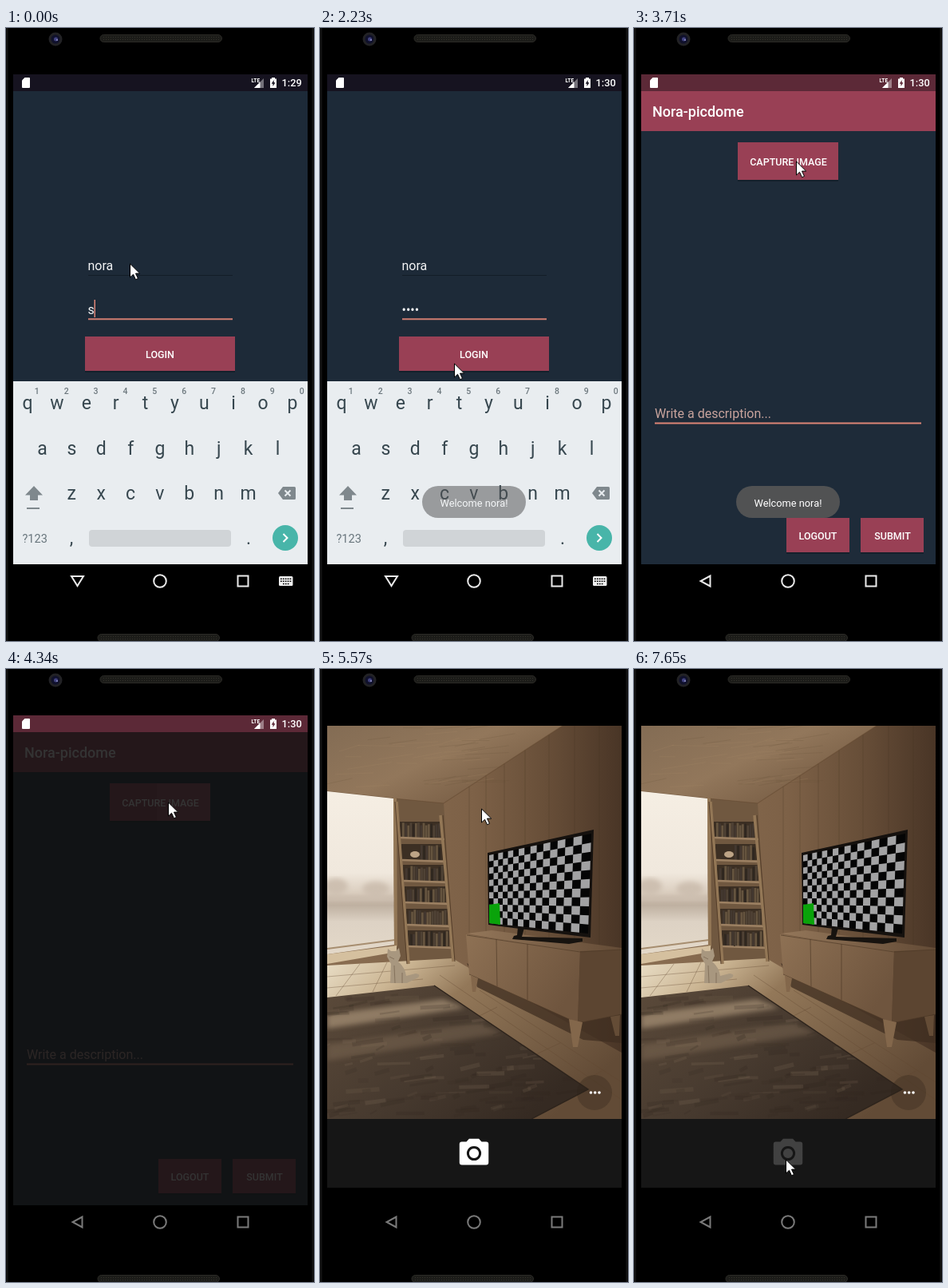
Recreate the animation shown at these times as an HTML page. Size 386 by 767 pixels, loop 8 s.

```html
<!DOCTYPE html>
<html lang="en">
<head>
<meta charset="utf-8">
<title>Phone login and camera</title>
<style>
html, body { margin: 0; width: 100%; height: 100%; overflow: hidden; background: #000; }
svg { display: block; width: 100vw; height: 100vh; font-family: Roboto, sans-serif; }
.mid { text-anchor: middle; }
.btn { font-size: 12.5px; font-weight: 500; fill: #fff; text-anchor: middle; }
.field { font-size: 16px; fill: #f2f3f4; }
.key { font-size: 23px; fill: #37474f; text-anchor: middle; }
.hint { font-size: 10.5px; font-weight: 500; fill: #6c777d; text-anchor: middle; }
</style>
</head>
<body>
<svg viewBox="0 0 386 767">
<defs>
  <linearGradient id="ceilFill" x2="1" y2=".7"><stop stop-color="#836c54"/><stop offset=".5" stop-color="#92775b"/><stop offset="1" stop-color="#71573f"/></linearGradient>
  <linearGradient id="wallFill"><stop stop-color="#8a6e52"/><stop offset=".5" stop-color="#7d6147"/><stop offset=".75" stop-color="#674e38"/><stop offset="1" stop-color="#493526"/></linearGradient>
  <linearGradient id="skyFill" x2="0" y2="1"><stop stop-color="#f5eee3"/><stop offset=".5" stop-color="#f0e8dd"/><stop offset=".63" stop-color="#d9ccbd"/><stop offset=".68" stop-color="#b9aa9a"/><stop offset=".8" stop-color="#ddd2c4"/><stop offset="1" stop-color="#e3d8c8"/></linearGradient>
  <linearGradient id="floorFill" x2="1" y2=".6"><stop stop-color="#eadfc8"/><stop offset=".22" stop-color="#cbb593"/><stop offset=".42" stop-color="#937859"/><stop offset="1" stop-color="#624b36"/></linearGradient>
  <linearGradient id="rugFill" x2="1" y2=".6"><stop stop-color="#5b4a3a"/><stop offset=".55" stop-color="#473a2f"/><stop offset="1" stop-color="#352a22"/></linearGradient>
  <linearGradient id="topFill"><stop stop-color="#94775a"/><stop offset="1" stop-color="#634b36"/></linearGradient>
  <linearGradient id="doorFill" x2="1" y2=".5"><stop stop-color="#8e7154"/><stop offset="1" stop-color="#6f553e"/></linearGradient>
  <filter id="soft"><feGaussianBlur stdDeviation="3"/></filter>
  <clipPath id="photoClip"><path d="M9 71h369v492H9z"/></clipPath>
  <clipPath id="rugClip"><path id="rugShape" d="M9 411L143 396 336 526 265 563H9z"/></clipPath>
  <clipPath id="paneClip"><path id="paneShape" d="M9 153L92 162 93 345 9 357z"/></clipPath>
  <path id="camIcon" fill-rule="evenodd" d="M-8-24H8L12.5-19H20a4 4 0 0 1 4 4V15a4 4 0 0 1-4 4H-20a4 4 0 0 1-4-4V-15a4 4 0 0 1 4-4h7.500zM0-12a12 12 0 1 0 .01 0zM0-8a8 8 0 1 1-.01 0z"/>
  <g id="statusIcons" fill="#fff">
    <path d="M23.500 62H29a1 1 0 0 1 1 1V74a1 1 0 0 1-1 1H21a1 1 0 0 1-1-1V65.500z"/>
    <text x="307.500" y="67.500" font-size="6.500" font-weight="700">LTE</text>
    <path d="M323 63V75H311z" opacity=".4"/><path d="M318.500 67.500V75H311z"/>
    <path fill-rule="evenodd" d="M333 63.500V62h4v1.500h2V75h-8V63.500zM335.700 65l-3 4.800h1.800V73l3-4.800h-1.800z"/>
  </g>
</defs>

<path fill="#000" d="M0 0h386v767H0z"/>
<path d="M1.500 0V767M384.500 0V767" stroke="#141414" stroke-width="2"/>
<g fill="#1c1c19" stroke="#2b2a26"><rect x="118" y="8.500" width="152.500" height="9" rx="4.500"/><rect x="115" y="758.500" width="152.500" height="9" rx="4.500"/></g>
<path d="M122 11.500H267M122 14.500H267M119 761.500H264M119 764.500H264" stroke="#33322b" stroke-dasharray="1 2"/>
<circle cx="62" cy="14" r="8.500" fill="#222225"/><circle cx="62" cy="14" r="5.500" fill="#10112b"/><circle cx="62.500" cy="14" r="2.500" fill="#41427f"/><circle cx="64" cy="15" r="1" fill="#9192c8"/>

<g id="login">
  <path fill="#1d2a38" d="M9 58h369v384H9z"/><path fill="#161320" d="M9 58h369v21H9z"/>
  <text class="field" x="102.500" y="303">nora</text>
  <path d="M103 309.500H284" stroke="#131d27"/>
  <text id="password" class="field" x="102.500" y="358"></text>
  <rect id="pwCaret" y="340" width="1.500" height="22" fill="#dd8577"/>
  <path d="M103 364.300H284" stroke="#d07d71" stroke-width="2"/>
  <path fill="#14202b" d="M99 388h188v43H99z"/><path fill="#994055" d="M99 386h188v43H99z"/>
  <text class="btn" x="193" y="412.500">LOGIN</text>
  <path fill="#e9edf0" d="M9 442h369v229H9z"/>
  <g id="keys"></g>
  <path fill="#7f888d" d="M35 573L46 584.500H40V591H30V584.500H24zM26 600h16v2H26zM347 574h14.500q1.500 0 1.500 1.500v13q0 1.500-1.500 1.500H347l-6-8z"/>
  <path d="M349.500 578.500l7 7m0-7l-7 7" stroke="#e9edf0" stroke-width="2"/>
  <text x="20.500" y="644" font-size="14.500" fill="#68757c">?123</text>
  <rect x="104" y="628" width="178" height="21" rx="4" fill="#d0d4d7"/>
  <circle cx="350" cy="638" r="16" fill="#48b5a9"/><path d="M347.500 633l5 5-5 5" fill="none" stroke="#fff" stroke-width="2"/>
</g>

<g id="home">
  <path fill="#1e2b39" d="M9 58h369v613H9z"/><path fill="#994055" d="M9 79h369v50H9z"/>
  <text x="23" y="111" font-size="18" font-weight="500" fill="#fff">Nora-picdome</text>
  <path fill="#15202b" d="M130 145h126v47H130zM191 615h79v43H191zM284 615h79v43H284z"/>
  <path fill="#994055" d="M130 143h126v47H130zM191 613h79v43H191zM284 613h79v43H284z"/>
  <path id="pressed" fill="#b6596e" d="M189 143h67v47H189z"/>
  <text class="btn" x="193.500" y="172">CAPTURE IMAGE</text>
  <text class="btn" x="230.500" y="639.500">LOGOUT</text><text class="btn" x="324" y="639.500">SUBMIT</text>
  <text class="field" x="26" y="487.500" style="fill:#c9a49d">Write a description...</text>
  <path id="noteCaret" fill="#dd8577" d="M26 470h1.700v22H26z"/>
  <path d="M26 494.500H360" stroke="#dd8577" stroke-width="2"/>
</g>
<path id="fade" fill="#101010" d="M9 79h369v592H9z"/>
<g id="status">
  <path id="statusBar" fill="#5c2937" d="M9 58h369v21H9z"/>
  <use href="#statusIcons"/>
  <text id="clock" x="345.500" y="73.300" font-size="12.800" font-weight="500" fill="#fff"></text>
</g>
<g id="toast"><rect x="128" y="573" width="130" height="40" rx="20" fill="#515253"/><text class="mid" x="193" y="598.500" font-size="12.800" fill="#fff">Welcome nora!</text></g>

<g id="splash"><path fill="#1d1d1d" d="M9 58h369v613H9z"/><use href="#camIcon" x="193" y="364" fill="#6d6e71"/></g>

<g id="camera">
  <path fill="#000" d="M9 58h369v613H9z"/>
  <g id="photo" clip-path="url(#photoClip)">
    <path fill="url(#wallFill)" d="M9 71h369v492H9z"/>
    <path fill="url(#ceilFill)" d="M9 71H304L155 168 93 162 9 153z"/>
    <g id="grain" fill="none"></g>
    <path fill="#705840" d="M93 162l62 6 12 196-72 6z"/>
    <path d="M9 153l84 9 62 6L304 71" fill="none" stroke="#60472f" stroke-width="1.200" opacity=".5"/>
    <use href="#paneShape" fill="url(#skyFill)"/>
    <g clip-path="url(#paneClip)"><g filter="url(#soft)" fill="#cdbfb0"><ellipse cx="20" cy="272" rx="15" ry="10"/><ellipse cx="70" cy="275" rx="17" ry="9"/><path d="M0 284h100v8H0z"/></g></g>
    <path d="M9 350l85-11" stroke="#a78e70" stroke-width="2"/><path fill="#937756" d="M92 161l4 1 1 185-4 3z"/>
    <path fill="#d5c09f" d="M9 357l87-11v8L9 369z"/>
    <path fill="url(#floorFill)" d="M9 371l157-9 17 10 195 108v83H9z"/>
    <path d="M9 385l160-14M9 399l120-11M50 369L20 409M84 367L66 404M150 383l228 156M200 402l178 115M200 434l22-11M271 482l30-14M325 519l28-16" fill="none" stroke="#5e462f" opacity=".35"/>
    <path fill="#3f2e20" opacity=".75" d="M184 368l139 70 55-12v42l-48-4-133-66z"/>
    <use href="#rugShape" fill="url(#rugFill)"/>
    <g id="weave" clip-path="url(#rugClip)"><path filter="url(#soft)" fill="#b09a7e" opacity=".65" d="M9 432l145-19 28 11L9 450z"/><path filter="url(#soft)" fill="#8a745d" opacity=".4" d="M9 470l190-28 30 14L9 490z"/></g>
    <path d="M143 396L336 526 265 563" fill="none" stroke="#2e241c" stroke-width="1.500"/>
    <g id="books"></g>
    <path d="M96 166l15 203M151 183l16 183" stroke="#937756" stroke-width="3.500"/>
    <path d="M94 166l15 203M154 183l15 183" stroke="#543d29"/>
    <ellipse cx="119" cy="232" rx="6" ry="4" fill="#bda486"/>
    <path fill="#a8977f" d="M85 350l4 3h6l4-4 2 10-3 7q9 8 10 18l12-3q7 1 3 5l-14 7H88l1-24-5-9z"/>
    <path d="M93 371l1 22M103 380v13M87 360l6 3" stroke="#76634d" opacity=".7" fill="none"/>
    <path fill="url(#topFill)" d="M184 331l31-4 163 22v5l-53 1z"/>
    <path fill="url(#doorFill)" d="M183 332l143 21-3 90-136-61z"/><path fill="#5c4531" d="M326 353l52-2v81l-55 11z"/>
    <path d="M221 338l1 59M260 344v70M184 333l142 21 52-3M187 382l136 61 55-11" fill="none" stroke="#4e3a27" opacity=".65"/>
    <path fill="#83674b" d="M189 383l9 4-3 17h-4zM312 438l17 4-6 31h-6z"/><path fill="#644c36" d="M364 435l12-2-1 26h-5z"/>
    <path fill="#17130f" d="M248 323l8 1-3 11 76 2v4l-17 3-71-6 2-4 4-1z"/>
    <path fill="#15110e" d="M210 230l133-29-4 135-128-16z"/>
    <g id="checker"></g>
    <path fill="#0aa30a" d="M212 295l13-2 1 27-14-2z"/>
  </g>
  <circle cx="344" cy="530" r="22" fill="#2b2119" opacity=".3"/>
  <g fill="#fff"><circle cx="339.500" cy="530" r="1.800"/><circle cx="344.700" cy="530" r="1.800"/><circle cx="350" cy="530" r="1.800"/></g>
  <path id="panel" d="M9 563h369v86H9z"/>
  <use id="shutter" href="#camIcon" transform="translate(193 606) scale(.76)"/>
  <circle id="ripple" cx="190" cy="613" r="20" fill="#1f4a86"/>
</g>

<g id="nav" fill="none" stroke-width="2">
  <path id="hideKeys" d="M82 686H97L89.500 698z"/><path id="back" d="M95.500 685.500V698.500L83.500 692z"/>
  <circle cx="193" cy="692" r="7.800"/><path d="M290.500 685.500h13v13h-13z"/>
</g>
<g id="keyboardIcon"><rect x="342" y="686" width="17.500" height="12" rx="1.500" fill="#eee"/><path d="M344 689.300h14M344 692.300h14M347 695.500h8" stroke="#000" stroke-width="1.500" stroke-dasharray="1.700 1.200"/></g>
<path id="mouse" d="M.5 0V17l4-3.700 3 6.500 3-1.400-3-6.300h5.200z" fill="#fff" stroke="#000"/>
</svg>
<script>
const el = {};
document.querySelectorAll('[id]').forEach(e => el[e.id] = e);
const add = (id, markup) => el[id].insertAdjacentHTML('beforeend', markup);
const set = (id, name, value) => el[id].setAttribute(name, value);
const show = (id, alpha) => set(id, 'opacity', +alpha);

let seed = 7;
const rand = (a, b) => a + (b - a) * ((seed = seed * 16807 % 2147483647) / 2147483647);

function buildKeys() {
  const label = (cls, x, y, s) => add('keys', `<text class="${cls}" x="${x}" y="${y}">${s}</text>`);
  [['qwertyuiop', 27, 477], ['asdfghjkl', 45.5, 534], ['zxcvbnm', 82.3, 590]].forEach(([row, x, y]) =>
    [...row].forEach((c, i) => label('key', x + i * 36.88, y, c)));
  [...'1234567890'].forEach((c, i) => label('hint', 38.8 + i * 36.88, 458, c));
  label('key', 82, 646, ',');
  label('key', 304, 646, '.');
}

function buildRoom() {
  for (let i = 0; i < 45; i++) {
    const x = rand(9, 200), y = rand(71, 150);
    add('grain', `<path d="M${x} ${y}l${rand(20, 60)} ${rand(-9, 1)}" stroke="${i % 2 ? '#a98c6c' : '#67503a'}" opacity=".2"/>`);
  }
  [187, 208, 231, 257, 287, 319, 350].forEach(x =>
    add('grain', `<path d="M${x} ${Math.max(71, 168 - (x - 155) * .65)}V${340 + (x - 168) * .5}" stroke="#473321" opacity=".28"/>`));
  for (let i = 0; i < 130; i++) {
    const y = rand(400, 560);
    add('weave', `<path d="M${rand(0, 310)} ${y}l${rand(8, 45)} ${rand(-6, 0)}" stroke="${i % 3 ? '#2d231c' : '#8a7660'}" stroke-width="${rand(2, 6)}" opacity="${rand(.08, .22)}"/>`);
  }
  [211, 239, 265, 292, 320, 347].forEach((y, row) => {
    const left = 102 + row * 2, right = 152 + row * 2;
    add('books', `<path fill="#3c2f23" d="M${left - 2} ${y - 20}H${right}V${y}H${left - 2}z"/>`);
    for (let x = left + (row == 1 ? 22 : 1); x < right - 4; x += 3.2) {
      const top = y - rand(15, 19);
      add('books', `<path fill="${['#4f4235', '#2f2720', '#65543f', '#433830'][rand(0, 4) | 0]}" d="M${x} ${top}h2.7V${y}h-2.7z"/>`);
    }
    add('books', `<path d="M${left - 1} ${y}L${right + 4} ${y + 2}" stroke="#9c8062" stroke-width="2.500"/>`);
  });
}

// Checkerboard on the angled screen, with columns widening toward the viewer
function buildChecker() {
  const cols = 16, rows = 11;
  const point = (c, r) => {
    const u = c / cols, v = r / rows, s = u * 85 / ((1 - u) * 125 + u * 85);
    const top = 233 - 27 * s, bottom = 318 + 13 * s;
    return `${212 + s * (128 - 4 * v)} ${top + (bottom - top) * v}`;
  };
  const quad = (c, r, w, h, fill) => add('checker',
    `<path fill="${fill}" d="M${point(c, r)}L${point(c + w, r)} ${point(c + w, r + h)} ${point(c, r + h)}z"/>`);
  quad(0, 0, cols, rows, '#050505');
  for (let c = 0; c < cols; c++)
    for (let r = 0; r < rows; r++)
      if ((c + r) % 2 == 0) quad(c, r, 1, 1, '#a2a2a3');
}

// Value of the latest [time, value...] step
const at = (t, steps) => steps.filter(s => s[0] <= t).pop().slice(1);
const mousePath = [
  [0, 155, 295], [1050, 155, 304], [1170, 155, 318], [1320, 164, 382], [1440, 168, 420],
  [3200, 174, 350], [3320, 188, 215], [3440, 199, 110], [3560, 203, 161], [3710, 203, 167],
  [5570, 202, 175], [5690, 202, 310], [5810, 201, 473], [5960, 200, 614], [6230, 190, 614]];
const typing = [[0, 's', 110.5], [250, '•a', 117], [400, '••n', 122.5], [520, '•••d', 128], [1960, '••••', 125]];
const fades = [[0, 0], [4100, .3], [4220, .6], [4340, .85], [4770, 1]];

function draw(t) {
  const [x, y] = at(t, mousePath), [text, caret] = at(t, typing);
  const home = t >= 2350, cam = t >= 5450, fade = at(t, fades)[0];
  set('mouse', 'transform', `translate(${x} ${y})`);
  el.password.textContent = text;
  set('pwCaret', 'x', caret);
  show('pwCaret', t < 1050 || t >= 1320 && t < 1960);
  el.clock.textContent = t < 1960 ? '1:29' : '1:30';

  show('login', t < 2500);
  show('home', at(t, [[0, 0], [2350, .6], [2500, 1]])[0]);
  show('noteCaret', t < 2780 || t >= 3200 && t < 3710);
  show('pressed', t >= 3950 ? .6 : 0);
  show('fade', fade);
  show('status', t < 5170);
  set('statusBar', 'fill', home ? '#5c2937' : '#161320');
  show('toast', at(t, [[0, 0], [2230, .52], [2350, 1], [4220, .5], [4340, 0]])[0]);
  show('splash', at(t, [[0, 0], [5020, .5], [5170, 1]])[0]);
  el.splash.style.clipPath = t < 5170 ? 'inset(21px 0 0 0)' : 'none';

  show('camera', cam);
  show('photo', t < 5570 ? .5 : 1);
  const [panel, icon] = at(t, [[0, '#161616', '#fff'], [6510, '#141d2b', '#566275'], [6970, '#151a21', '#43474d'], [7120, '#161616', '#414141']]);
  set('panel', 'fill', panel);
  set('shutter', 'fill', icon);
  show('ripple', t >= 6510 && t < 6970 ? .65 : 0);

  show('hideKeys', !home);
  show('back', home);
  show('keyboardIcon', !home);
  set('nav', 'stroke', fade ? at(t, [[0, '#bbb'], [4340, '#7a7a7a']])[0] : '#eaeaea');
}

buildKeys();
buildRoom();
buildChecker();
(function tick() {
  draw(performance.now() % 8000);
  requestAnimationFrame(tick);
})();
</script>
</body>
</html>
```
